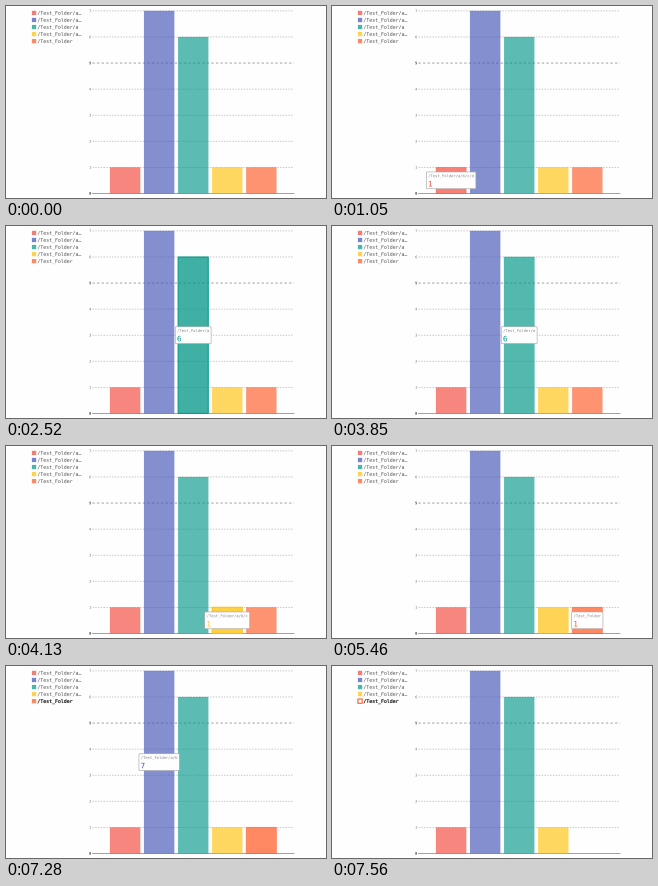
These frames come from a looping animation (320x192 px, 8 s). A matplotlib script:

```python
import matplotlib.pyplot as plt
from matplotlib.animation import FuncAnimation
from matplotlib.patches import FancyBboxPatch, PathPatch, Rectangle
from matplotlib.path import Path
from matplotlib.textpath import TextPath
from matplotlib.transforms import Affine2D

W, H, DPI = 320, 192, 100
INTERVAL, LOOP, STEP = 40, 8000, 70
PX = 72 / DPI  # one pixel in points
MONO = {"family": "DejaVu Sans Mono"}

BASE_Y, UNIT = 187.4, 26.07
BAR_X, BAR_W, BAR_STEP = 104, 30.2, 34.05
COLORS = ["#F44336", "#3F51B5", "#009688", "#FFC107", "#FF5722"]
VALUES = [1, 7, 6, 1, 1]
NAMES = ["/Test_Folder/a/b/c/d", "/Test_Folder/a/b", "/Test_Folder/a",
         "/Test_Folder/a/b/c", "/Test_Folder"]

# (bar, enter, leave) in ms
HOVERS = [(0, 350, 1050), (1, 1190, 2380), (2, 2450, 3850),
          (3, 4060, 5460), (4, 5460, 6440), (4, 7280, 7490)]
# (bar, show, hide) in ms
TIPS = [(0, 350, 1190), (1, 1190, 2450), (2, 2450, 4060),
        (3, 4060, 5460), (4, 5460, 6440), (1, 6440, 7560)]
TIP_FADE_IN, TIP_FADE_OUT = 350, 7350
LEGEND_ON, BAR_OFF = 7280, 7490

fig = plt.figure(figsize=(W / DPI, H / DPI), dpi=DPI, facecolor="#fefefe")
ax = fig.add_axes([0, 0, 1, 1])
ax.set_xlim(0, W)
ax.set_ylim(H, 0)
ax.axis("off")


def value_y(value):
    return BASE_Y - UNIT * value


def add_text(x, y, text, size, color, z=5, align="left", **style):
    """Place text with its baseline at pixel (x, y)."""
    path = TextPath((0, 0), text, size=size, prop={**MONO, **style})
    if align == "right":
        x -= path.get_extents().x1
    glyphs = Path(path.vertices * [1, -1] + [x, y], path.codes)
    return ax.add_patch(PathPatch(glyphs, fc=color, lw=0, zorder=z))


def add_guides():
    for value in range(8):
        y = value_y(value)
        major = value in (0, 5)
        if value == 0:
            look = dict(color="#8c8c8c", lw=0.8 * PX)
        else:
            dash = 2.0 if major else 1.4
            look = dict(color="#8a8a8a" if major else "#b0b0b0",
                        lw=(0.8 if major else 0.7) * PX,
                        ls=(0, (dash / 0.7, dash / 0.7)),
                        dash_capstyle="butt")
        ax.plot([86.5, 288], [y, y], zorder=1, snap=False, **look)
        add_text(85, y + 1.25, str(value), 3.5,
                 "#333333" if major else "#666666", align="right",
                 weight="bold" if major else "normal")


def add_bar(i):
    x, top = BAR_X + BAR_STEP * i, value_y(VALUES[i])
    shape = dict(xy=(x, top), width=BAR_W, height=BASE_Y - top, snap=False)
    fill = ax.add_patch(Rectangle(**shape, fc=COLORS[i], lw=0, zorder=2))
    edge = ax.add_patch(Rectangle(**shape, fill=False, ec=COLORS[i], zorder=3))
    return fill, edge


def add_legend(i):
    y = 4.8 + 7.05 * i
    label = NAMES[i] if len(NAMES[i]) <= 15 else NAMES[i][:14] + "…"
    box = ax.add_patch(Rectangle((25.9, y), 4.3, 4.3, fc=COLORS[i], ec=COLORS[i],
                                 lw=0, alpha=0.7, snap=False, zorder=5))
    text = add_text(31.4, y + 3.9, label, 4.87, "#4a4a4a")
    return box, text


def add_tip(i):
    width, height = 2.29 * len(NAMES[i]) + 3.8, 16.8
    x = BAR_X + BAR_STEP * i + (BAR_W - width) / 2
    y = (BASE_Y + value_y(VALUES[i]) - height) / 2
    box = FancyBboxPatch((x, y), width, height,
                         boxstyle="round,pad=0,rounding_size=0.8",
                         fc="#fefefe", ec="#a6a6a6", lw=0.6 * PX,
                         snap=False, zorder=8)
    ax.add_patch(box)
    label = add_text(x + 1.9, y + 5.2, NAMES[i], 3.8, "#858585", z=9)
    value = add_text(x + 1.7, y + 14.5, str(VALUES[i]), 7.4, COLORS[i], z=9)
    return box, label, value


def hover_level(i, t):
    """Highlight strength, 0 to 1, with one half-way step at each end."""
    level = 0
    for bar, enter, leave in HOVERS:
        if bar != i:
            continue
        if enter <= t < leave:
            level = 0.55 if t < enter + STEP else 1
        elif leave <= t < leave + STEP:
            level = 0.3
    return level


def tip_alpha(i, t):
    if not any(bar == i and show <= t < hide for bar, show, hide in TIPS):
        return 0
    if t < TIP_FADE_IN + STEP:
        return 0.6
    if t >= TIP_FADE_OUT:
        return 0.75 - 0.25 * (t - TIP_FADE_OUT) / STEP
    return 1


add_guides()
bars = [add_bar(i) for i in range(5)]
legends = [add_legend(i) for i in range(5)]
tips = [add_tip(i) for i in range(5)]


def draw(n):
    t = int((n + 0.5) * INTERVAL) // STEP * STEP
    for i, (fill, edge) in enumerate(bars):
        level = hover_level(i, t)
        fill.set_alpha(0.64 + 0.11 * level)
        edge.set_alpha(0.25 + 0.55 * level)
        edge.set_linewidth((0.35 + 0.85 * level) * PX)
        shown = i < 4 or t < BAR_OFF
        fill.set_visible(shown)
        edge.set_visible(shown)
        alpha = tip_alpha(i, t)
        for part in tips[i]:
            part.set_visible(alpha > 0)
            part.set_alpha(alpha)

    box, text = legends[4]
    text.set_facecolor("#000000" if t >= LEGEND_ON else "#4a4a4a")
    text.set_edgecolor("#000000")
    text.set_linewidth(0.15 * PX if t >= LEGEND_ON else 0)
    hollow = t >= BAR_OFF
    box.set_facecolor("#fefefe" if hollow else COLORS[4])
    box.set_linewidth(1.2 * PX if hollow else 0)
    box.set_alpha(0.9 if hollow else 0.7)
    return []


anim = FuncAnimation(fig, draw, frames=LOOP // INTERVAL, interval=INTERVAL,
                     repeat=True, repeat_delay=0, blit=False)
plt.show()
```
